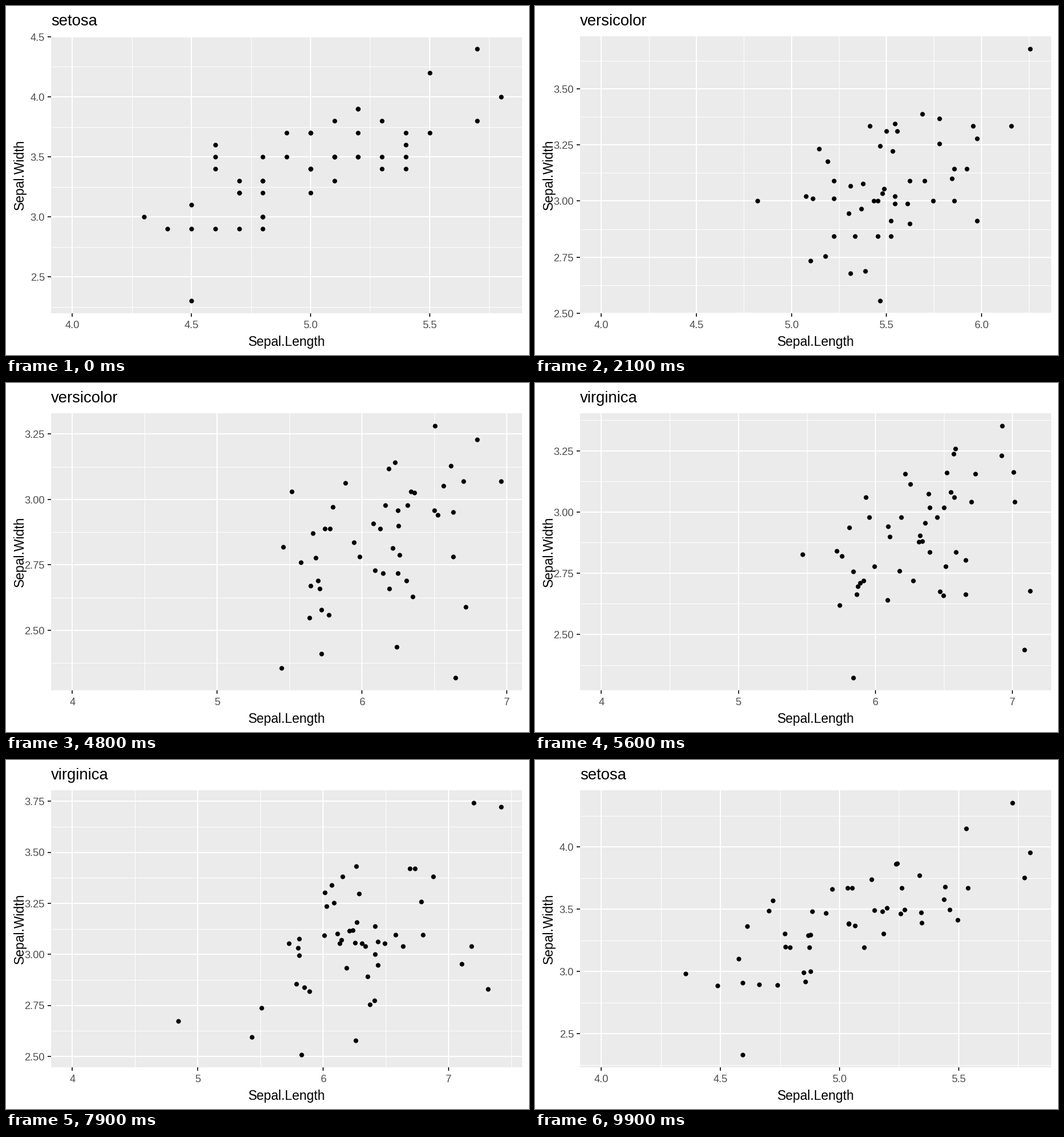
A matplotlib script that plays this animation: 917x611 px, repeating every 10000 ms.

```python
import itertools
import math

import matplotlib.pyplot as plt
import numpy as np
from matplotlib.animation import FuncAnimation
from matplotlib.collections import LineCollection
from matplotlib.patches import Rectangle

plt.rcParams["font.family"] = "Liberation Sans"

W, H, DPI = 917, 611, 128
PX = 72 / DPI                                  # one pixel in points
LEFT, RIGHT, TOP, BOTTOM = 78.8, 905.5, 52.9, 538.2
FRAMES, INTERVAL = 100, 100
MOVES = [(6, 33), (40, 67), (74, 100)]         # first and last frame of each move
SPECIES = ["setosa", "versicolor", "virginica"]

# Outermost points in tenths: x, y for each species; they set the axis ranges
OUTER = np.array([
    [51, 35, 70, 32, 63, 33],
    [47, 32, 69, 31, 71, 30],
    [46, 34, 63, 33, 49, 25],
    [44, 29, 66, 29, 67, 25],
    [54, 37, 50, 20, 65, 32],
    [48, 30, 60, 22, 68, 30],
    [43, 30, 61, 29, 57, 25],
    [58, 40, 56, 29, 58, 28],
    [57, 44, 67, 31, 64, 32],
    [51, 35, 58, 27, 77, 38],
    [57, 38, 62, 22, 77, 26],
    [51, 38, 56, 25, 60, 22],
    [46, 36, 63, 25, 77, 28],
    [54, 34, 55, 24, 79, 38],
    [55, 42, 60, 27, 63, 28],
    [50, 32, 60, 34, 77, 30],
    [45, 23, 61, 30, 69, 31],
]) / 10

# Inner cloud per species: mean x, mean y, sd x, sd y, correlation
CLOUDS = [(4.99, 3.41, 0.27, 0.27, 0.6),
          (5.85, 2.77, 0.50, 0.23, 0.55),
          (6.52, 2.99, 0.45, 0.24, 0.35)]
INNER = 33


def make_points():
    """Array of shape (species, point, xy)."""
    rng = np.random.default_rng(8)
    groups = []
    for i, (mx, my, sx, sy, r) in enumerate(CLOUDS):
        z = rng.normal(size=(INNER, 2))
        z = (z - z.mean(axis=0)) / z.std(axis=0)
        z[:, 1] = r * z[:, 0] + math.sqrt(1 - r * r) * z[:, 1]
        inner = np.array([mx, my]) + z.clip(-1.8, 1.8) * [sx, sy]
        groups.append(np.vstack([OUTER[:, 2 * i:2 * i + 2], inner.round(1)]))
    return np.array(groups)


POINTS = make_points()


def nice_breaks(lo, hi, m=5):
    """Extended Wilkinson labelling: returns (first, step, count)."""
    nice = [1, 5, 2, 2.5, 4, 3]
    span = hi - lo
    best, found = -2.0, None

    def total(simple, cover, dense):
        return 0.25 * simple + 0.2 * cover + 0.5 * dense + 0.05

    for j in itertools.count(1):
        for i, q in enumerate(nice):
            simple_max = 2 - i / (len(nice) - 1) - j
            if total(simple_max, 1, 1) < best:
                return found
            for k in itertools.count(2):
                dense_max = 2 - (k - 1) / (m - 1) if k >= m else 1
                if total(simple_max, 1, dense_max) < best:
                    break
                z0 = math.ceil(math.log10(span / (k + 1) / j / q))
                for z in itertools.count(z0):
                    step = j * q * 10.0 ** z
                    width = step * (k - 1)
                    half = max(width - span, 0) / 2
                    cover_max = 1 - half ** 2 / (0.1 * span) ** 2
                    if total(simple_max, cover_max, dense_max) < best:
                        break
                    start0 = (math.floor(hi / step) - (k - 1)) * j
                    start1 = math.ceil(lo / step) * j
                    for start in range(start0, start1 + 1):
                        a = start * step / j
                        b = a + width
                        has_zero = start % j == 0 and a <= 0 <= b
                        simple = simple_max - 1 + has_zero
                        cover = 1 - 0.5 * ((hi - b) ** 2 + (lo - a) ** 2) / (0.1 * span) ** 2
                        ratio = (k - 1) / width * (max(b, hi) - min(a, lo)) / (m - 1)
                        score = total(simple, cover, 2 - max(ratio, 1 / ratio))
                        if score > best:
                            best, found = score, (a, step, k)


def expand(lo, hi):
    pad = 0.05 * (hi - lo)
    return lo - pad, hi + pad


def grid_values(lo, hi):
    first, step, count = nice_breaks(lo, hi)
    major = np.round(first + step * np.arange(count), 9)
    minor = np.round(first + step * (np.arange(count + 1) - 0.5), 9)
    return [v[(v >= lo) & (v <= hi)] for v in (major, minor)]


def labels(values):
    digits = next(d for d in range(6) if np.allclose(values, np.round(values, d), atol=1e-8))
    return [f"{v:.{digits}f}" for v in values]


def pose(frame):
    """Current state index and progress towards the next one."""
    for i, (start, end) in enumerate(MOVES):
        if frame <= end:
            return i, max(0.0, (frame - start) / (end - start))


fig = plt.figure(figsize=(W / DPI, H / DPI), dpi=DPI, facecolor="white")
ax = fig.add_axes([0, 0, 1, 1])
ax.set(xlim=(0, W), ylim=(H, 0))
ax.axis("off")
ax.add_patch(Rectangle((79, 53), 826, 485, fc="#EBEBEB", lw=0, zorder=0))


def add_lines(color, width, z):
    lines = LineCollection([], colors=color, linewidths=width * PX, zorder=z)
    return ax.add_collection(lines, autolim=False)


def add_text(x, y, s, size, color="black", **kw):
    return ax.text(x, y, s, fontsize=size * 150 / 72 * PX, color=color, **kw)


minor_grid = add_lines("white", 1, 1)
major_grid = add_lines("white", 2, 2)
ticks = add_lines("#333333", 2, 2)
dots, = ax.plot([], [], "o", color="black", ms=8.2 * PX, mew=0, zorder=3)

title = add_text(79, 34, "", 13.2, va="baseline")
add_text(492, 595, "Sepal.Length", 11, ha="center", va="baseline")
add_text(24, 295.5, "Sepal.Width", 11, ha="center", va="center", rotation=90)
tick_labels = []


def v_lines(xs, y0=53, y1=538):
    return [[(x, y0), (x, y1)] for x in xs]


def h_lines(ys, x0=79, x1=905):
    return [[(x0, y), (x1, y)] for y in ys]


def draw(frame):
    i, t = pose(frame)
    j = (i + 1) % len(SPECIES)
    x, y = (POINTS[i] + (POINTS[j] - POINTS[i]) * t).T
    x0, x1 = expand(4, x.max())
    y0, y1 = expand(y.min(), y.max())

    def to_x(v):
        return LEFT + (v - x0) / (x1 - x0) * (RIGHT - LEFT)

    def to_y(v):
        return BOTTOM - (v - y0) / (y1 - y0) * (BOTTOM - TOP)

    x_major, x_minor = grid_values(x0, x1)
    y_major, y_minor = grid_values(y0, y1)
    xs, ys = to_x(x_major), to_y(y_major)

    minor_grid.set_segments(v_lines(to_x(x_minor)) + h_lines(to_y(y_minor)))
    major_grid.set_segments(v_lines(xs) + h_lines(ys))
    ticks.set_segments(v_lines(xs, 538, 544) + h_lines(ys, 73, 79))
    dots.set_data(to_x(x), to_y(y))
    title.set_text(SPECIES[j if t > 0.5 else i])

    while tick_labels:
        tick_labels.pop().remove()
    for px, s in zip(xs, labels(x_major)):
        tick_labels.append(add_text(px, 563.7, s, 8.8, "#4D4D4D", ha="center", va="baseline"))
    for py, s in zip(ys, labels(y_major)):
        tick_labels.append(add_text(68, py + 6.9, s, 8.8, "#4D4D4D", ha="right", va="baseline"))
    return []


anim = FuncAnimation(fig, draw, frames=FRAMES, interval=INTERVAL, repeat=True, repeat_delay=0)
plt.show()
```
